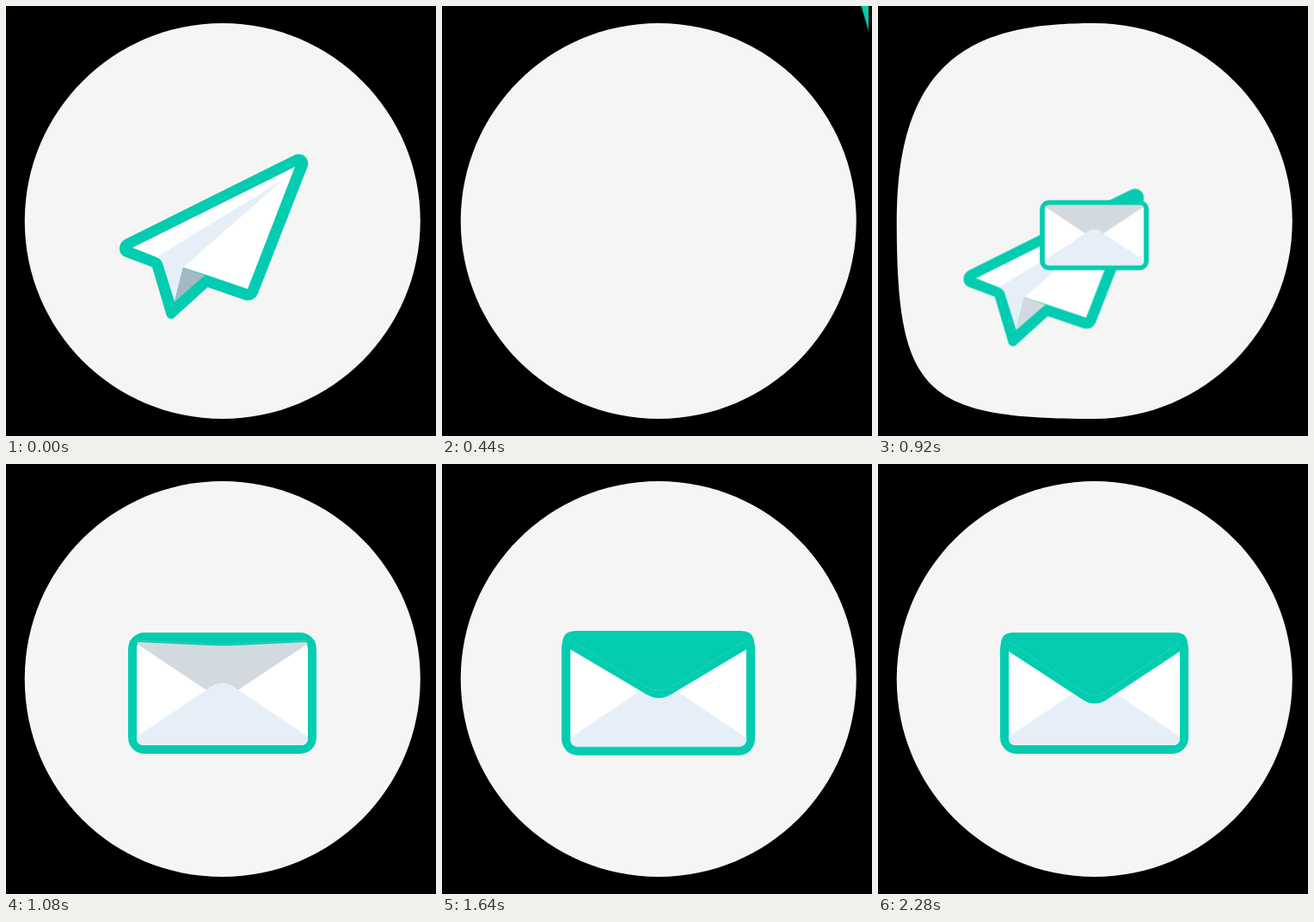
Animation, 500 px wide and 500 px high, one loop 2.92 s. Source, as an HTML page without scripts:

```html
<!DOCTYPE html>
<html lang="en">
<head>
<meta charset="utf-8">
<title>Paper plane to envelope</title>
<style>
  html, body { margin: 0; width: 100%; height: 100%; overflow: hidden; background: #000; }
  svg { display: block; width: 100%; height: 100%; }

  .green { fill: #03ccb0; }
  .white { fill: #fff; }
  .pale { fill: #e6eff8; }
  .grey { fill: #d2dae0; }

  .disc, .fly, .shrink, .fold, .mail, .flap, .lid, .seam {
    animation: 2.92s linear infinite both;
  }

  .disc { fill: #f5f5f5; animation-name: bulge; }
  .fly { animation-name: fly; }
  .shrink { transform-origin: 241.5px 268px; animation-name: shrink; }
  .fold { animation-name: fold; }
  .mail { transform-origin: 251.5px 266.5px; animation-name: pop; }
  .flap { animation-name: show; }
  .lid { animation-name: lid; }
  .seam { fill: none; stroke: #46d6c1; stroke-width: .6; animation-name: seam; }

  /* lower left quarter of the disc swells as the plane comes in */
  @keyframes bulge {
    0%, 26.712% {
      d: path("M251.75 20C378.8 20 481.75 123 481.75 250S378.8 480 251.75 480C124.7 480 21.75 377 21.75 250S124.7 20 251.75 20Z");
      animation-timing-function: ease-in-out;
    }
    31.507% {
      d: path("M251.75 20C378.8 20 481.75 123 481.75 250S378.8 480 251.75 480C51.75 480 21.75 450 21.75 250S124.7 20 251.75 20Z");
      animation-timing-function: ease-in-out;
    }
    37.671%, 100% {
      d: path("M251.75 20C378.8 20 481.75 123 481.75 250S378.8 480 251.75 480C124.7 480 21.75 377 21.75 250S124.7 20 251.75 20Z");
    }
  }

  @keyframes fly {
    0% { transform: translate(0, 0); animation-timing-function: cubic-bezier(.42, 0, .75, .75); }
    20.548% { transform: translate(486px, -484px); animation-timing-function: step-start; }
    23.288% { transform: translate(-370px, 358px); animation-timing-function: cubic-bezier(.333, 0, .667, 1); }
    33.562%, 100% { transform: translate(0, 0); }
  }

  @keyframes shrink {
    0%, 29.452% { transform: scale(1); }
    31.507% { transform: scale(.963); }
    36.301%, 100% { transform: scale(0); }
  }

  @keyframes fold {
    0%, 22% { fill: #a2b9c3; }
    22.01%, 100% { fill: #d2dae0; }
  }

  @keyframes pop {
    0%, 28.082% { transform: scale(0); }
    31.507% { transform: scale(.571); animation-timing-function: ease-out; }
    34.932%, 53.425% { transform: scale(1); }
    56.164% { transform: scale(1.027); animation-timing-function: ease-out; }
    59.589% { transform: scale(1.045); animation-timing-function: ease-in-out; }
    67.123%, 100% { transform: scale(1); }
  }

  @keyframes show {
    0%, 35.37% { opacity: 0; }
    35.38%, 100% { opacity: 1; }
  }

  @keyframes lid {
    0%, 35.377% {
      d: path("M142.5 206L238 206Q252 206 266 206L360.5 206Q355 204 349 200L154 200Q148 204 142.5 206Z");
    }
    58.253%, 100% {
      d: path("M143 212L238 274Q252 283 266 274L360 212Q361 196 346 196L157 196Q142 196 143 212Z");
    }
  }

  @keyframes seam {
    0%, 35.377% { d: path("M153 205L238 205Q252 205 266 205L351 205"); }
    58.253%, 100% { d: path("M153 207L238 265Q252 273 266 265L351 207"); }
  }
</style>
</head>
<body>
<svg viewBox="0 0 500 500">
  <clipPath id="stage"><rect x="4" width="492" height="500"/></clipPath>

  <path class="disc" d="M251.75 20C378.8 20 481.75 123 481.75 250S378.8 480 251.75 480C124.7 480 21.75 377 21.75 250S124.7 20 251.75 20Z"/>

  <g clip-path="url(#stage)">
    <g class="fly">
      <g class="shrink">
        <path class="green" d="M138 271.5L335 173.5C345 169 354 178 350.5 187L293 334Q289 344 278 342L234.5 327L197 361C193.5 365.5 188 364 186.5 359.5L170 303.5L138 291.5C130 288 130 276 138 271.5Z"/>
        <path class="white" d="M147 281L336 187L281 329L240 315L206 304L175 292Z"/>
        <path class="pale" d="M175 292L323 201.500L206 304L196 344L182 299Q180 294 175 292Z"/>
        <path class="fold" d="M206 304L232 313.500L228 316L196 344Z"/>
      </g>
    </g>
  </g>

  <g class="mail">
    <rect class="green" x="142" y="196" width="219" height="141" rx="19"/>
    <rect class="white" x="152" y="206" width="199" height="121" rx="8"/>
    <path class="grey" d="M152 209Q154 206 160 206H343Q349 206 351 209L251.500 275Z"/>
    <path class="pale" d="M152 317L234 262Q251.500 247 269 262L351 317V319Q351 327 343 327H160Q152 327 152 319Z"/>
    <g class="flap">
      <path class="lid green" d="M143 212L238 274Q252 283 266 274L360 212Q361 196 346 196L157 196Q142 196 143 212Z"/>
      <path class="seam" d="M153 207L238 265Q252 273 266 265L351 207"/>
    </g>
  </g>
</svg>
</body>
</html>
```
